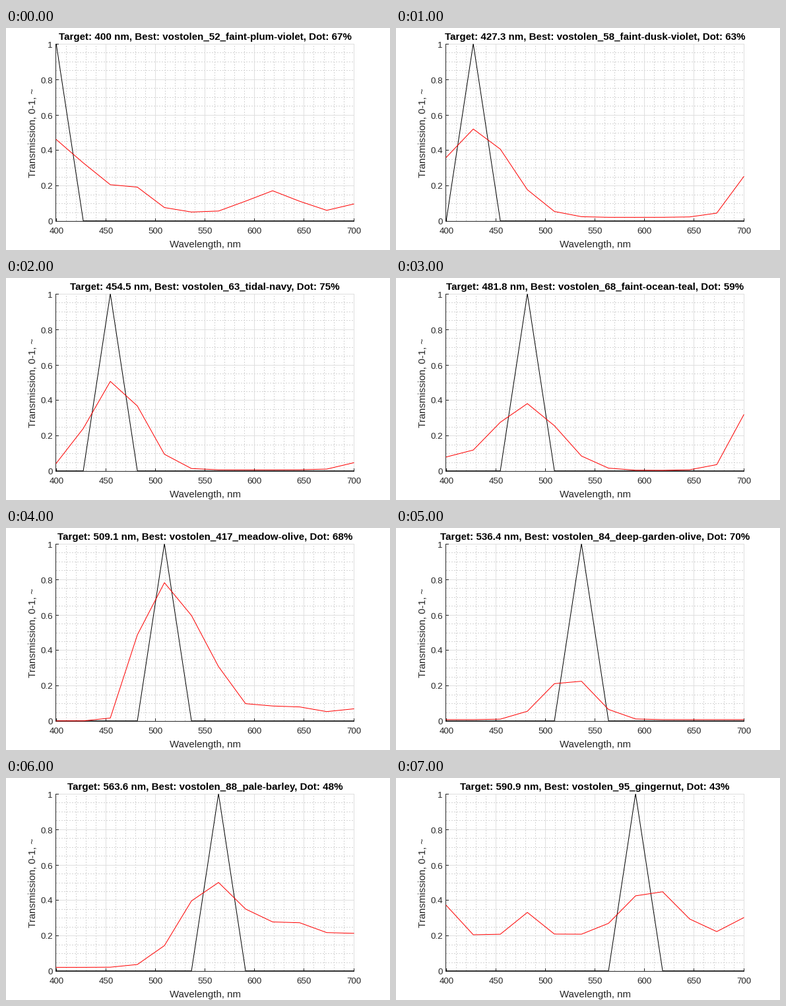
These frames come from a looping animation (582x337 px, 8000 ms). A matplotlib script:

```python
import matplotlib.pyplot as plt
import numpy as np
from matplotlib.animation import FuncAnimation
from matplotlib.patches import Rectangle

W, H, DPI = 582, 337, 100
PX = 72 / DPI  # points per pixel
LEFT, RIGHT, TOP, BOTTOM = 76.1, 527.1, 24.5, 293.5
SPINE = 75.5
LIFT = 0.7  # the curves sit slightly above the pixel grid
INK, MAJOR, MINOR = "#262626", "#dfdfdf", "#d4d4d4"

# name, match in percent, base level, rise at the red end,
# then pass bands as (centre nm, height, width nm)
FILTERS = [
    ("vostolen_52_faint-plum-violet", 67, .045, .05,
     [(373, .47, 76), (482, .085, 19), (618, .125, 34)]),
    ("vostolen_58_faint-dusk-violet", 63, .02, .23, [(430, .5, 48)]),
    ("vostolen_63_tidal-navy", 75, .006, .04, [(460, .51, 37)]),
    ("vostolen_68_faint-ocean-teal", 59, .003, .314,
     [(400, .06, 27), (480.5, .377, 45)]),
    ("vostolen_417_meadow-olive", 68, 0, .05,
     [(495.5, .65, 20.5), (533.6, .58, 35.5), (629, .085, 57)]),
    ("vostolen_84_deep-garden-olive", 70, .007, 0, [(524, .25, 32.7)]),
    ("vostolen_88_pale-barley", 48, .02, .1,
     [(555, .45, 40), (640, .25, 60)]),
    ("vostolen_95_gingernut", 43, .2, .1,
     [(400, .17, 14), (482, .13, 16), (607, .27, 37)]),
]
WAVES = np.linspace(400, 700, 12)

plt.rcParams["font.family"] = "Liberation Sans"
fig = plt.figure(figsize=(W / DPI, H / DPI), dpi=DPI, facecolor="white")
ax = fig.add_axes([0, 0, 1, 1])
ax.set(xlim=(0, W), ylim=(H, 0))
ax.axis("off")


def transmission(base, rise, bands):
    total = base + rise * np.exp((WAVES - 700) / 12)
    for centre, height, width in bands:
        total = total + height * np.exp(-((WAVES - centre) / width) ** 2)
    return total


def to_x(wave):
    return LEFT + (RIGHT - LEFT) * (wave - 400) / 300


def to_y(value):
    return BOTTOM - (BOTTOM - TOP) * value


def pixel(v):
    return np.floor(v) + 0.5


def rule(x0, y0, x1, y1, color, z, **style):
    ax.plot([x0, x1], [y0, y1], color=color, lw=PX, zorder=z, snap=False,
            solid_capstyle="butt", dash_capstyle="butt", **style)


def label(x, y, text, size, ha="center", **style):
    style = {"color": INK, "rotation_mode": "anchor", **style}
    return ax.text(x, y, text, fontsize=size * PX, ha=ha, va="baseline",
                   **style)


def curve(color, z):
    line, = ax.plot([], [], color=color, lw=PX, zorder=z, snap=False)
    line.set_clip_path(Rectangle((75, 24), 453, 270, transform=ax.transData))
    return line


dotted = dict(ls=(0, (2, 2)))
for wave in range(400, 701, 10):
    x = pixel(to_x(wave))
    if wave % 50:
        rule(x, 293, x, 24, MINOR, 1, **dotted)
        continue
    if wave > 400:
        rule(x, 293, x, 24, MAJOR, 2)
    rule(x, 293, x, 289, INK, 3)
    label(x, 312.4, str(wave), 13.33)

for k in range(21):
    y = pixel(to_y(k / 20))
    if k % 4:
        rule(76, y, 528, y, MINOR, 1, **dotted)
        continue
    rule(76, y, 528, y, MAJOR, 2)
    rule(76, y, 80, y, INK, 3)
    label(70.8, y + 5, f"{k / 20:g}", 13.33, ha="right")

rule(SPINE, 24, SPINE, 294, INK, 3)
rule(75, BOTTOM, 528, BOTTOM, INK, 3)

label(301.5, 333, "Wavelength, nm", 15)
label(45, 159, "Transmission, 0-1, ~", 15, rotation=90)
title = label(301.5, 18, "", 15.15, color="black", weight="bold")
target = curve("black", 4)
best = curve("red", 5)


def draw(i):
    name, match, *spectrum = FILTERS[i]
    target.set_data(to_x(WAVES), to_y(np.eye(12)[i]) - LIFT)
    best.set_data(to_x(WAVES), to_y(transmission(*spectrum)) - LIFT)
    title.set_text(f"Target: {WAVES[i]:.4g} nm, Best: {name}, Dot: {match}%")
    return target, best, title


anim = FuncAnimation(fig, draw, frames=len(FILTERS), interval=1000,
                     repeat=True, repeat_delay=0)
plt.show()
```
